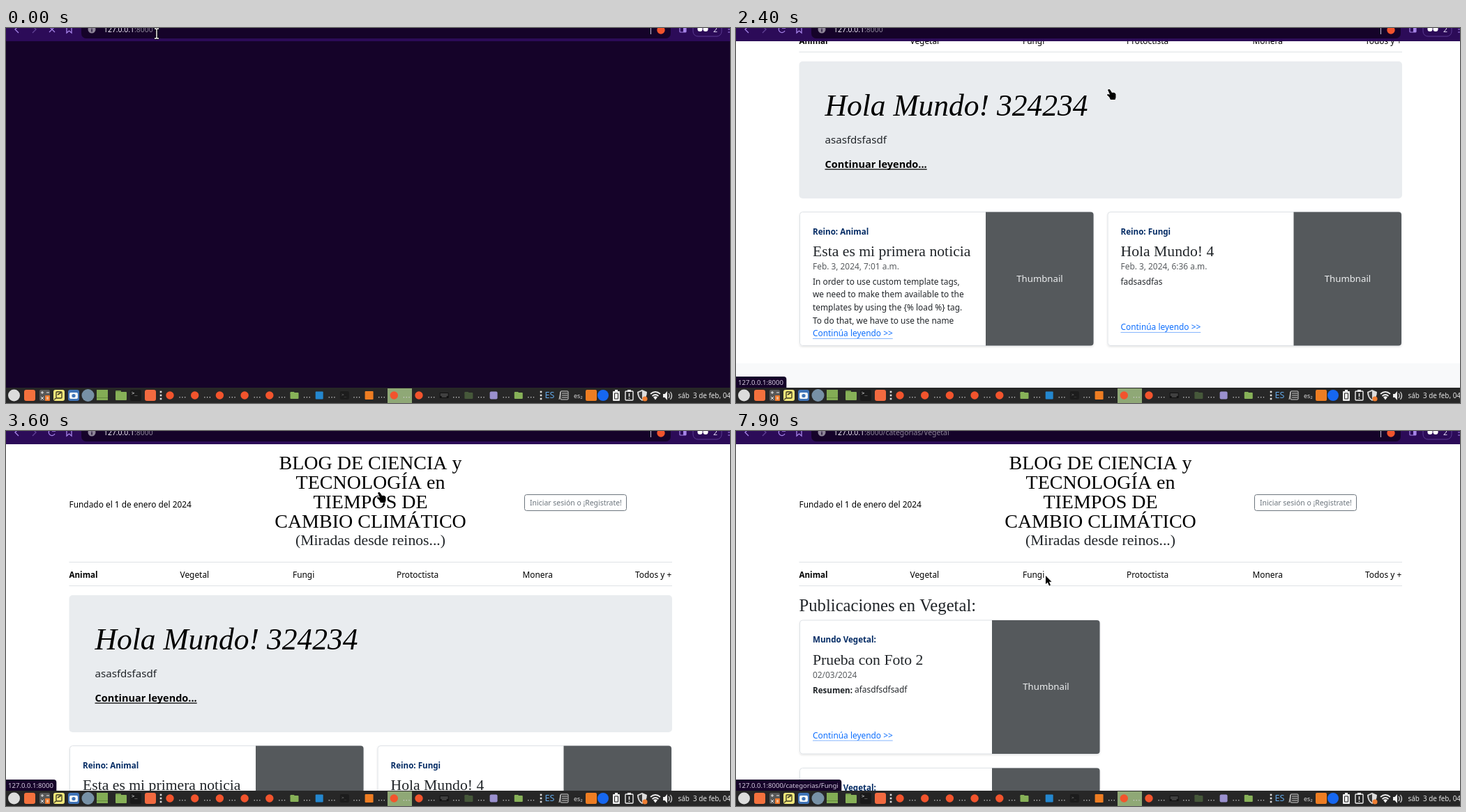
Recreate the animation shown at these times as an HTML page with a canvas. Size 1038 px wide and 539 px high, loop 8000 ms.

```html
<!DOCTYPE html>
<html lang="es">
<head>
<meta charset="utf-8">
<title>Blog de ciencia</title>
<style>
html, body { margin: 0; width: 100%; height: 100%; overflow: hidden; }
canvas { display: block; }
</style>
</head>
<body>
<canvas id="stage" width="1038" height="539"></canvas>
<script>
const ctx = document.getElementById('stage').getContext('2d');
const SANS = '"Noto Sans", "Open Sans", sans-serif';
const SERIF = '"Liberation Serif", "Noto Serif", serif';
const BODY = '11.9px ' + SANS, STRONG = 'bold 11.6px ' + SANS, HEAD = '21.7px ' + SERIF;
const NIGHT = '#150329', INK = '#212529', ORANGE = '#f2542d', GREEN = '#87b158', PALE = '#d8d8d8';

function box(x, y, w, h, color, r = 0) {
  ctx.fillStyle = color;
  ctx.beginPath();
  ctx.roundRect(x, y, w, h, r);
  ctx.fill();
}
function frame(x, y, w, h, color, r = 0, width = 1) {
  ctx.strokeStyle = color;
  ctx.lineWidth = width;
  ctx.beginPath();
  ctx.roundRect(x, y, w, h, r);
  ctx.stroke();
}
function disc(x, y, r, color) {
  ctx.fillStyle = color;
  ctx.beginPath();
  ctx.arc(x, y, r, 0, 7);
  ctx.fill();
}
function stroke(path, color, width = 1.3) {
  ctx.strokeStyle = color;
  ctx.lineWidth = width;
  ctx.stroke(new Path2D(path));
}
function shape(path, color) {
  ctx.fillStyle = color;
  ctx.fill(new Path2D(path));
}
function text(s, x, y, font = BODY, color = '#000', align = 'left') {
  ctx.font = font;
  ctx.fillStyle = color;
  ctx.textAlign = align;
  ctx.fillText(s, x, y);
  return ctx.measureText(s).width;
}

// Value of [time, ...numbers] keys at t, linear between neighbours
function track(keys, t) {
  let i = keys.findLastIndex(k => k[0] <= t);
  const a = keys[i], b = keys[i + 1] || a;
  const p = b === a ? 0 : (t - a[0]) / (b[0] - a[0]);
  return a.map((v, n) => typeof v === 'number' ? v + (b[n] - v) * p : v);
}

const scrollKeys = [
  [0, 0], [2000, 0], [2100, 24], [2200, 80], [2300, 140], [2400, 188], [2500, 200], [2600, 200],
  [2700, 203], [3200, 203], [3300, 151], [3400, 85], [3500, 28], [3600, 0]
];
const pointerKeys = [
  [0, 216, 8, 'beam'], [200, 216, 8, 'beam'], [300, 240, 22, 'arrow'], [800, 440, 46, 'hand'],
  [900, 440, 46, 'hand'], [1100, 491, 73, 'hand'], [1700, 535, 88, 'hand'], [4100, 535, 88, 'hand'],
  [4400, 535, 92, 'hand'], [4500, 535, 92, 'hand'], [5000, 578, 129, 'hand'], [5500, 578, 129, 'hand'],
  [5600, 590, 146, 'arrow'], [5800, 590, 146, 'arrow'], [5900, 267, 214, 'hand'], [6100, 267, 214, 'hand'],
  [6200, 284, 203, 'hand'], [6500, 284, 203, 'hand'], [6600, 342, 212, 'arrow'], [6900, 342, 212, 'arrow'],
  [7000, 392, 206, 'arrow'], [7100, 392, 206, 'arrow'], [7200, 432, 202, 'hand'], [7600, 432, 202, 'hand'],
  [7700, 437, 202, 'hand'], [7800, 437, 202, 'hand'], [7900, 444, 208, 'arrow']
];

function link(x, y) {
  const w = text('Continúa leyendo >>', x, y, BODY, '#0d6efd');
  box(x, y + 3, w, 1, '#86b6fe');
}

function card(x, y, w, label, title, date, lines, linkY) {
  ctx.save();
  ctx.shadowColor = 'rgba(0,0,0,.1)';
  ctx.shadowBlur = 3;
  ctx.shadowOffsetY = 1.5;
  box(x, y, w, 193, '#fff', 4);
  ctx.restore();
  frame(x + .5, y + .5, w - 1, 192, '#dee2e6', 4);
  box(x + w - 155, y + .5, 154.5, 192, '#55595c', [0, 4, 4, 0]);
  text('Thumbnail', x + w - 77.5, y + 100.5, '13.2px ' + SANS, '#eceeef', 'center');
  const left = x + 19;
  text(label, left, y + 32.5, STRONG, '#052c65');
  text(title, left, y + 64, HEAD, INK);
  text(date, left, y + 83, BODY, '#585c5f');
  lines.forEach((line, i) => {
    let indent = 0;
    if (line.startsWith('Resumen:')) {
      indent = text('Resumen:', left, y + 105, STRONG, INK) + 3;
      line = line.slice(9);
    }
    text(line, left + indent, y + 104.7 + i * 18.66, BODY, INK);
  });
  link(left, y + linkY);
}

function header() {
  text('Fundado el 1 de enero del 2024', 90.5, 109.5);
  ['BLOG DE CIENCIA y', 'TECNOLOGÍA en', 'TIEMPOS DE', 'CAMBIO CLIMÁTICO'].forEach((s, i) =>
    text(s, 522.5, 55 + i * 28, '28px ' + SERIF, '#000', 'center'));
  text('(Miradas desde reinos...)', 522.5, 163.5, HEAD, INK, 'center');
  frame(743.5, 91.5, 146, 23, '#6c757d', 3);
  text('Iniciar sesión o ¡Registrate!', 817, 107, '10.45px ' + SANS, '#6c757d', 'center');
  box(90.5, 188, 864.5, 1, '#dee2e6');
  box(90.5, 222, 864.5, 1, '#dee2e6');
  text('Animal', 90.5, 211, STRONG);
  [['Vegetal', 249.5], ['Fungi', 411], ['Protoctista', 560], ['Monera', 740.5], ['Todos y +', 902]]
    .forEach(([s, x]) => text(s, x, 211));
}

function home() {
  header();
  box(90.5, 236, 864.5, 197, '#e9ecef', 5);
  text('Hola Mundo! 324234', 127.5, 314, 'italic 43.5px ' + SERIF);
  text('asasfdsfasdf', 127.5, 354, '300 15.1px ' + SANS, INK);
  const w = text('Continuar leyendo...', 127.5, 389, 'bold 14.5px ' + SANS);
  box(127.5, 390.5, w, 1.3, '#000');
  card(91, 452, 422, 'Reino: Animal', 'Esta es mi primera noticia', 'Feb. 3, 2024, 7:01 a.m.', [
    'In order to use custom template tags,', 'we need to make them available to the',
    'templates by using the {% load %} tag.', 'To do that, we have to use the name'
  ], 179);
  card(532.5, 452, 422, 'Reino: Fungi', 'Hola Mundo! 4', 'Feb. 3, 2024, 6:36 a.m.', ['fadsasdfas'], 170);
  box(0, 670, 1038, 200, '#f8f9fa');
}

function category() {
  header();
  text('Publicaciones en Vegetal:', 90.5, 259, '24.7px ' + SERIF, INK);
  for (const y of [271.5, 484])
    card(91, y, 431, 'Mundo Vegetal:', 'Prueba con Foto 2', '02/03/2024', ['Resumen: afasdfsdfsadf'], 170);
}

function toolbar(loading, path) {
  const lilac = '#a684e8';
  box(0, 0, 1038, 19, '#2c0b58');
  box(108, -10, 845, 25, NIGHT, 7);
  stroke('M18-3L13 2L18 7', lilac);
  stroke('M38-3L43 2L38 7', '#624397');
  if (loading) stroke('M62-2L70 6M70-2L62 6', lilac);
  else stroke('M70 0A4.6 4.6 0 1 0 70 4M70.500-4V0H66', lilac);
  stroke('M87-5V7L90.500 4L94 7V-5', lilac);
  disc(123, 2, 5.5, '#8d8598');
  box(122.4, -1, 1.3, 1.5, NIGHT);
  box(122.4, 1.5, 1.3, 4, NIGHT);
  const font = '10.4px ' + SANS;
  const w = text('127.0.0.1', 140, 6, font, '#f3eff8');
  text(':8000' + path, 140 + w, 6, font, '#8d8598');
  box(924, -2, 1, 11, '#c9c0d4');
  disc(939, 3, 5.7, ORANGE);
  frame(966, -4, 9, 10, lilac, 1, 1.2);
  box(971, -4, 4, 10, lilac);
  frame(985, -10, 41, 22, '#5b3a91', 7);
  disc(995, 1.5, 3.6, '#fff');
  disc(1003, 1.5, 3.6, '#fff');
  box(991, -2, 16, 2, '#fff');
  text('2', 1014, 6, '10.5px ' + SANS, '#e5dcf5');
  for (const y of [-2, 2, 6]) box(1035, y - .5, 6, 1, lilac);
}

function folder(x, color) {
  box(x - 6, 523, 6, 3, color, 1);
  box(x - 6, 524, 12, 9, color, 1);
}
function terminal(x, color) {
  box(x - 6, 522, 13, 12, '#1c1c1c', 2);
  text('>_', x - 4, 529, '6px "DejaVu Sans Mono", monospace', color);
}

function taskbar() {
  box(0, 517, 1038, 22, '#272727');
  disc(11.5, 528, 8.5, '#dcdcdc');
  box(26, 520, 16, 16, '#f4713d', 3);
  box(48, 520, 15, 16, '#585858', 2);
  box(56, 528, 7, 8, '#ef7a2d', 1);
  stroke('M50 524H54M52 522V526M58 524H62M50 530L54 534M54 530L50 534M58 531H61M58 533H61', '#eee', 1);
  box(68, 520, 16, 16, '#f3e77a', 3);
  frame(72, 523, 8, 9, '#3a3824', 1, 1.3);
  stroke('M74 527L79 524M72 532L69 534', '#3a3824', 1.5);
  box(89, 520, 16, 16, '#3f74b8', 3);
  box(91, 524, 12, 9, '#f2f5f8', 2);
  disc(97, 528.5, 2.6, '#3f74b8');
  disc(117.5, 528, 9, '#7791a6');
  box(130, 520, 16, 15, '#83ad55');
  box(130, 531, 16, 1, '#658b3d');
  box(157, 521, 8, 4, '#74994c', 1);
  box(157, 523, 16, 12, GREEN, 1);
  box(178, 520, 16, 16, '#1a1a1a', 2);
  text('>_', 180, 527, '7px "DejaVu Sans Mono", monospace', '#eee');
  box(199, 520, 16, 16, '#f26a40', 3);
  for (const x of [222, 767]) for (const y of [523, 528, 533]) box(x - 1.3, y - 1.3, 2.6, 2.6, '#ddd');

  box(547, 518, 35, 21, '#8fa876');
  const apps = 'bbbbbfvtpbbkdlf';
  [...apps].forEach((app, i) => {
    const x = 235 + i * 35.7;
    if (app === 'b') disc(x, 528, 5.7, ORANGE);
    if (app === 'f') folder(x, GREEN);
    if (app === 'd') folder(x, '#46583a');
    if (app === 'v') box(x - 5.5, 522.5, 11, 11, '#2487cf', 1);
    if (app === 't') terminal(x, '#777');
    if (app === 'p') box(x - 6, 522, 12, 12, '#ee7d22', 1);
    if (app === 'l') box(x - 5.5, 522.5, 11, 11, '#9b91cf', 2);
    if (app === 'k') {
      box(x - 6, 524, 13, 8, '#111', 1);
      stroke(`M${x - 5} 526h11m-11 2h11m-9 2h7`, '#888', .8);
    }
    for (const d of [13.5, 17.3, 21.1]) box(x + d, 530, 1.2, 1.4, '#ccc');
  });

  text('ES', 772.5, 532, '12.5px ' + SANS, '#62a8e8');
  frame(795, 522, 11, 12, PALE, 1);
  stroke('M797 525H805M797 528H805M797 531H805M793 534L795 523', PALE, 1);
  text('es₂', 814, 532, '9px ' + SANS, PALE);
  box(831, 520, 16, 16, '#ee7d22', 2);
  disc(856, 528, 8, '#1667f0');
  box(870, 522, 10, 14, '#eee', 1);
  box(873, 520, 4, 3, '#eee');
  frame(872.5, 525, 5, 8, '#272727', 0, 1);
  frame(888, 522, 11, 13, '#eee', 1, 1.4);
  box(891, 520, 5, 3, '#eee');
  stroke('M893.500 525V530M893.500 531.500V533', '#eee', 1.5);
  shape('M912 520L919 523Q919 532 912 536Q905 532 905 523Z', '#ddd');
  shape('M912 522V534Q907 531 907 524Z', '#3a3a3a');
  disc(916, 533, 3.6, '#ef7e32');
  stroke('M924 526Q931 520 938 526M926.500 529Q931 525 935.500 529', '#eee', 1.7);
  shape('M928 530.500Q931 528 934 530.500L931 534.500Z', '#eee');
  shape('M942 526H944.500L948 522V535L944.500 531H942Z', '#eee');
  stroke('M950 525Q952.500 528.500 950 532M952.500 523Q956.500 528.500 952.500 534', '#ddd', 1.2);
  text('sáb  3 de feb, 04', 963.5, 532, '9.9px ' + SANS, '#e4e4e4');
}

function bubble(path) {
  ctx.font = '9.55px ' + SANS;
  const w = ctx.measureText('127.0.0.1:8000' + path).width + 7.5;
  box(0, 501, w, 16, NIGHT, [0, 4, 0, 0]);
  text('127.0.0.1:8000' + path, 3, 513, ctx.font, '#d3cadf');
}

const pointers = {
  beam() {
    const path = 'M-3-7H-1L0-6L1-7H3M0-6V6M-3 7H-1L0 6L1 7H3';
    stroke(path, '#000', 3);
    stroke(path, '#fff', 1.4);
  },
  arrow() {
    const path = 'M0 0V12L2.800 9.500L5 14.500L7 13.600L4.900 8.800H8.500Z';
    stroke(path, '#fff', 1.6);
    shape(path, '#000');
  },
  hand() {
    const path = 'M-2 1Q0-1 1.500 1L4 5Q8 4 9.500 7V12L8.500 15H2L0 11L-3 8.500Q-3 6 0 7.500L1 7.500Z';
    stroke(path, '#fff', 1.2);
    shape(path, '#000');
  }
};

function draw(t) {
  const within = (a, b) => t >= a && t < b;
  const path = t >= 6600 ? '/categorias/Vegetal' : '';

  box(0, 0, 1038, 539, t < 300 ? NIGHT : '#fff');
  ctx.save();
  ctx.translate(0, -track(scrollKeys, t)[1]);
  if (within(400, 6600)) home();
  if (t >= 6800) category();
  ctx.restore();

  toolbar(t < 600 || within(4200, 4600) || within(6600, 6800), path);
  if (within(1400, 4600)) bubble('');
  if (within(6200, 6900)) bubble('/categorias/Vegetal');
  if (t >= 7700) bubble('/categorias/Fungi');
  taskbar();

  const [, x, y, kind] = track(pointerKeys, t);
  ctx.save();
  ctx.translate(Math.round(x), Math.round(y));
  pointers[kind]();
  ctx.restore();
}

// The screen refreshes ten times a second
function tick() {
  draw(Math.floor(performance.now() % 8000 / 100) * 100);
  requestAnimationFrame(tick);
}
tick();
</script>
</body>
</html>
```
